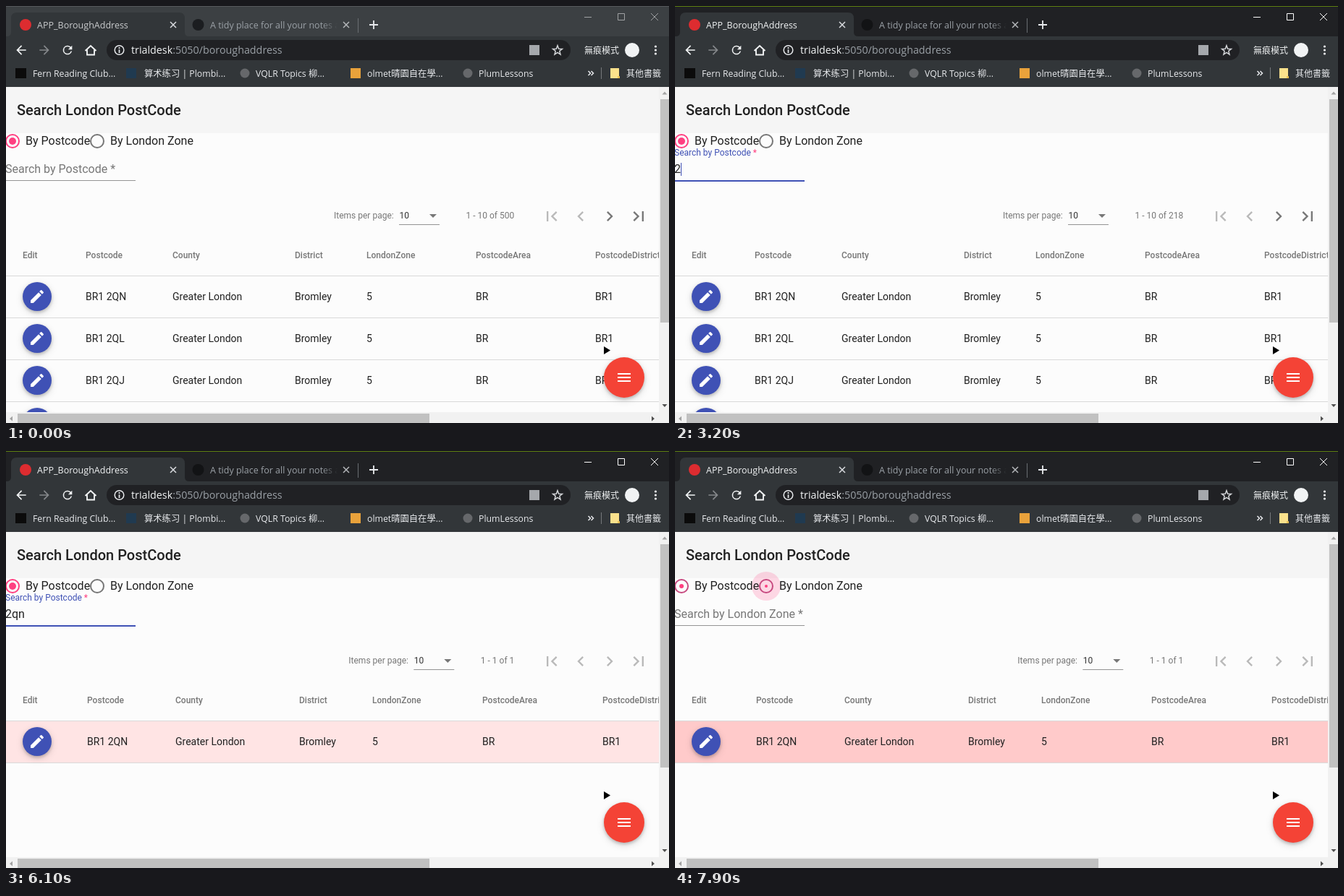
An HTML page that plays this animation: 916 by 577 pixels, repeating every 8 s.

```html
<!DOCTYPE html>
<html lang="en">
<head>
<meta charset="utf-8">
<title>Search table</title>
<style>
  html, body { margin: 0; width: 100%; height: 100%; overflow: hidden; background: #fcfcfc; }
  svg { display: block; }
  #stage { position: absolute; left: 0; top: 0; font-family: Roboto, "Liberation Sans", sans-serif; }
  text { white-space: pre; }
  .ui { font-family: "Open Sans", "Noto Sans CJK TC", "Noto Sans CJK", sans-serif; }
  .shadow { filter: drop-shadow(0 2px 2px rgba(0, 0, 0, .2)) drop-shadow(0 3px 5px rgba(0, 0, 0, .14)); }
</style>
</head>
<body>
<svg id="stage" width="916" height="577" viewBox="0 0 916 577"></svg>
<script>
const LOOP = 8000, STEP = 100;
const INK = '#212121', GREY = '#777777', BLUE = '#3f51b5', PINK = '#ff4081', PALE = '#9aa0a6';

const rect = (x, y, w, h, fill, more = '') =>
  `<rect x="${x}" y="${y}" width="${w}" height="${h}" fill="${fill}" ${more}/>`;
const circle = (x, y, r, fill, more = '') =>
  `<circle cx="${x}" cy="${y}" r="${r}" fill="${fill}" ${more}/>`;
const text = (x, y, str, size, fill, more = '') =>
  `<text x="${x}" y="${y}" font-size="${size}" fill="${fill}" ${more}>${str}</text>`;
const ui = (x, y, str, size, fill, more = '') => text(x, y, str, size, fill, 'class="ui" ' + more);
const fillPath = (d, fill, more = '') => `<path d="${d}" fill="${fill}" ${more}/>`;
const line = (d, stroke, width, more = '') =>
  `<path d="${d}" fill="none" stroke="${stroke}" stroke-width="${width}" ${more}/>`;
// A 24-unit glyph centred on a point
const glyph = (cx, cy, size, d, fill, more = '') =>
  `<path transform="translate(${cx - size / 2} ${cy - size / 2}) scale(${size / 24})" d="${d}" fill="${fill}" ${more}/>`;
const cross = (x, y, r, stroke, width) =>
  line(`M${x - r} ${y - r}l${2 * r} ${2 * r}m0 ${-2 * r}l${-2 * r} ${2 * r}`, stroke, width);

const ICON = {
  back: 'M20 11H7.83l5.59-5.59L12 4l-8 8 8 8 1.41-1.41L7.83 13H20z',
  forward: 'M12 4l-1.41 1.41L16.17 11H4v2h12.17l-5.58 5.59L12 20l8-8z',
  reload: 'M17.65 6.35A8 8 0 1 0 19.73 14h-2.08A6 6 0 1 1 12 6c1.66 0 3.14.69 4.22 1.78L13 11h7V4z',
  edit: 'M3 17.25V21h3.75L17.81 9.94l-3.75-3.75zM20.71 7.04a1 1 0 0 0 0-1.41l-2.34-2.34a1 1 0 0 0-1.41 0l-1.83 1.83 3.75 3.75z',
  menu: 'M3 18h18v-2H3zm0-5h18v-2H3zm0-7v2h18V6z',
  first: 'M18.41 16.59L13.82 12l4.59-4.59L17 6l-6 6 6 6zM6 6h2v12H6z',
  prev: 'M15.41 7.41L14 6l-6 6 6 6 1.41-1.41L10.83 12z',
  next: 'M10 6L8.59 7.41 13.17 12l-4.58 4.59L10 18l6-6z',
  last: 'M5.59 7.41L10.18 12l-4.59 4.59L7 18l6-6-6-6zM16 6h2v12h-2z'
};

function browser() {
  const light = '#e8eaed';
  const star = Array.from({ length: 10 }, (_, i) => {
    const a = i * Math.PI / 5 - Math.PI / 2, r = i % 2 ? 2.9 : 6.8;
    return `${(762 + r * Math.cos(a)).toFixed(1)} ${(61.5 + r * Math.sin(a)).toFixed(1)}`;
  }).join('L');
  return `<defs><linearGradient id="fade" gradientUnits="userSpaceOnUse" x1="436" x2="458" y1="0" y2="0">
      <stop stop-color="${PALE}"/><stop offset="1" stop-color="${PALE}" stop-opacity="0"/></linearGradient></defs>` +
    rect(0, 0, 916, 112, '#3c4043', 'id="frame"') +
    rect(0, 0, 916, 1, '#55585b', 'id="edge"') +
    fillPath('M0 42H1Q7 42 7 36V17Q7 9 15 9H239Q247 9 247 17V36Q247 42 253 42H916V112H0z', '#323639') +
    circle(27, 26, 8, '#dd2c30') +
    ui(43, 31, 'APP_BoroughAddress', 12.5, '#c9cbcd', 'id="tab"') +
    cross(231, 26, 4, '#dadce0', 1.5) +
    circle(265.5, 26, 8, '#1b1d20', 'id="dot"') +
    ui(282, 31, 'A tidy place for all your notes and', 12.5, 'url(#fade)') +
    cross(470, 26, 4, '#b4b7ba', 1.5) +
    rect(486, 17, 1, 20, '#6a6e72') +
    line('M502 26h12M508 20v12', light, 1.8) +
    `<g id="controls" stroke="#a0a2a4" fill="none"><path d="M799 15.5h10M845.5 10.5h9v9h-9zM891 10l10 10m0-10l-10 10"/></g>` +
    glyph(21, 61, 20, ICON.back, '#f1f3f4') +
    glyph(53, 61, 20, ICON.forward, '#85888b') +
    glyph(85, 61, 19, ICON.reload, '#f1f3f4') +
    line('M109.5 62l7.500-7 7.500 7M112 60v7.500h10V60', '#f1f3f4', 1.9) +
    rect(139, 47, 641, 28, '#202124', 'rx="14"') +
    circle(156.5, 61, 6.3, 'none', `stroke="${light}" stroke-width="1.5"`) +
    line('M156.500 57v2M156.500 60.300v4.700', light, 1.7) +
    ui(173, 66, `trialdesk<tspan fill="${PALE}">:5050/boroughaddress</tspan>`, 14.3, '#f1f3f4') +
    rect(723, 54, 14, 14, '#a5a8ac') +
    line(`M${star}z`, '#d2d4d7', 1.5) +
    ui(799, 66, '無痕模式', 12, '#f1f3f4') +
    circle(865, 61, 10, '#f1f3f4') +
    [56, 61, 66].map(y => circle(897.5, y, 1.6, '#f1f3f4')).join('') +
    rect(13, 86, 15, 14, '#0b0b0b') +
    rect(166, 86, 14, 14, '#203a50') +
    circle(330, 93, 6.5, '#66686b') +
    rect(476, 86, 14, 14, '#e9a23b') +
    circle(638, 93, 6.5, '#66686b') +
    [[37, 'Fern Reading Club...'], [191, '算术练习 | Plombi...'], [345, 'VQLR Topics 柳...'],
      [499, 'olmet晴園自在學...'], [653, 'PlumLessons']]
      .map(([x, s]) => ui(x, 98, s, 12.3, light)).join('') +
    line('M804.500 90l3 3-3 3M808.500 90l3 3-3 3', light, 1.5) +
    rect(822, 85, 1, 16, '#75787b') +
    fillPath('M835 86h12v14h-12z', '#fbe18c') + rect(845, 97, 3, 3, '#e8bf55') +
    ui(857, 98, '其他書籤', 12, light);
}

const radio = (x, id) =>
  circle(x, 187, 9, 'none', `id="ring${id}" stroke-width="2"`) + circle(x, 187, 0, PINK, `id="fill${id}"`);

function table(id, cols, codes) {
  const heads = ['Edit', 'Postcode', 'County', 'District', 'LondonZone', 'PostcodeArea', 'PostcodeDistrict'];
  const xs = [23, ...cols];
  let out = heads.map((h, i) => text(xs[i], 349, h, 12, GREY, 'font-weight="500"')).join('');
  out += rect(0, 373, 902, 1, 'rgba(0,0,0,.14)');
  codes.forEach((code, i) => {
    const y = 402 + i * 58;
    out += circle(43, y, 20, BLUE, 'class="shadow"') + glyph(43, y, 24, ICON.edit, '#fff');
    [code, 'Greater London', 'Bromley', '5', 'BR', 'BR1']
      .forEach((s, c) => { out += text(cols[c], y + 5, s, 14, INK); });
    out += rect(0, y + 29, 902, 1, 'rgba(0,0,0,.14)');
  });
  return `<g id="${id}">${out}</g>`;
}

function page() {
  return `<svg x="0" y="112" width="902" height="450" viewBox="0 112 902 450">` +
    rect(0, 112, 902, 450, '#fcfcfc') + rect(0, 112, 902, 64, '#f5f5f5') +
    text(15, 151, 'Search London PostCode', 20, INK, 'font-weight="500"') +
    circle(126, 187, 0, PINK, 'id="ripple" fill-opacity=".2"') +
    radio(9, 1) + radio(126, 2) +
    text(27, 192, 'By Postcode', 16, INK) + text(144, 192, 'By London Zone', 16, INK) +
    `<text id="label" font-size="16"><tspan id="hint"></tspan><tspan id="must"> *</tspan></text>` +
    text(-1, 231, '', 16, INK, 'id="value"') +
    rect(0, 241, 179, 1, '#949494') + rect(0, 241, 179, 2, BLUE, 'id="bar"') +
    line('M0 235' + 'l2 -2l2 2'.repeat(4), '#e53935', 1, 'id="wavy"') +
    rect(0, 217, 1, 18, BLUE, 'id="caret"') +
    `<g id="pager">` + text(453, 294, 'Items per page:', 12, GREY) + text(543.5, 294, '10', 12, '#333') +
    fillPath('M585 288h10l-5 5z', GREY) + rect(543, 302, 56, 1, '#949494') +
    text(635.5, 294, '', 12, GREY, 'id="range"') + `</g>` +
    glyph(754, 291, 28, ICON.first, '#b9b9b9') + glyph(794, 291, 28, ICON.prev, '#b9b9b9') +
    glyph(834, 291, 28, ICON.next, GREY, 'id="next"') + glyph(874, 291, 28, ICON.last, GREY, 'id="last"') +
    rect(0, 374, 902, 57, 'none', 'id="glow"') +
    table('all', [110, 230, 399, 498, 649, 814], ['BR1 2QN', 'BR1 2QL', 'BR1 2QJ', 'BR1 2QH']) +
    table('one', [112, 234, 405, 506, 658, 824], ['BR1 2QN']) +
    circle(854, 514, 28, '#f44336', 'class="shadow"') + glyph(854, 514, 24, ICON.menu, '#fff') +
    fillPath('M826 471v11l9-5.500z', '#000') + `</svg>` +
    rect(902, 112, 14, 465, '#f1f1f1') + rect(0, 562, 902, 15, '#f1f1f1') +
    rect(904, 129, 12, 309, '#c1c1c1') + rect(16, 564, 569, 13, '#c1c1c1') +
    fillPath('M906.500 122.500h7l-3.500-4zM9 567.500v7l-4-3.500z', '#a3a3a3') +
    fillPath('M906.500 551h7l-3.500 4zM892 567.500v7l4-3.500z', '#505050');
}

const stage = document.getElementById('stage');
stage.innerHTML = browser() + page();
const el = {};
stage.querySelectorAll('[id]').forEach(n => { el[n.id] = n; });

const set = (id, attrs) => { for (const k in attrs) el[id].setAttribute(k, attrs[k]); };
const show = (id, on) => set(id, { visibility: on ? 'visible' : 'hidden' });
const clamp = v => Math.max(0, Math.min(1, v));
const ease = p => 1 - (1 - p) ** 3;
const mix = (a, b, p) => '#' + [1, 3, 5].map(i => {
  const u = parseInt(a.slice(i, i + 2), 16), v = parseInt(b.slice(i, i + 2), 16);
  return Math.round(u + (v - u) * p).toString(16).padStart(2, '0');
}).join('');
const at = (steps, t) => steps.filter(s => s[0] <= t).pop()[1];

// Each step: start time, value
const VALUE = [[0, ''], [3200, '2'], [4000, '2q'], [5400, '2qn'], [7900, '']];
const CARET = [[0, -1], [2300, 0], [2600, -1], [3200, 8], [3700, -1], [4000, 17], [4500, -1],
  [5000, 17], [5400, 26], [5800, -1]];
const RANGE = [[0, ['1 - 10 of 500', 0]], [3200, ['1 - 10 of 218', 0]],
  [4000, ['1 - 10 of 10', 6.7]], [5400, ['1 - 1 of 1', 20.3]]];
const GLOW = [[0, 'none'], [6100, '#ffe4e4'], [6300, '#ffd6d6'], [6400, '#ffcaca']];

function draw(time) {
  const t = Math.floor(time / STEP) * STEP;
  const active = t >= 2300, zone = t >= 7900;

  set('frame', { fill: active ? '#202124' : '#3c4043' });
  set('edge', { fill: active ? '#5c7d0f' : '#55585b' });
  set('tab', { fill: active ? '#f1f3f4' : '#c9cbcd' });
  set('dot', { fill: active ? '#121315' : '#1b1d20' });
  set('controls', { stroke: active ? '#ffffff' : '#a0a2a4' });

  const rise = zone ? 0 : ease(clamp((t - 2200) / 400));
  const blur = clamp((t - 6200) / 300);
  const focus = rise * (1 - blur);
  set('label', { transform: `translate(-1 ${231 - 24 * rise}) scale(${1 - .25 * rise})` });
  el.hint.textContent = zone ? 'Search by London Zone' : 'Search by Postcode';
  set('hint', { fill: mix(GREY, BLUE, focus) });
  set('must', { fill: mix(GREY, PINK, focus) });
  const w = 179 * (.5 + .5 * rise);
  set('bar', { x: (179 - w) / 2, width: w, opacity: active ? 1 - blur : 0 });

  el.value.textContent = at(VALUE, t);
  const caret = at(CARET, t);
  show('caret', caret >= 0);
  set('caret', { x: Math.max(0, caret) });
  show('wavy', t >= 4900 && t < 5400);

  const [range, shift] = at(RANGE, t);
  el.range.textContent = range;
  set('pager', { transform: `translate(${shift} 0)` });
  const more = t < 4000 ? GREY : '#b9b9b9';
  set('next', { fill: more });
  set('last', { fill: more });

  show('all', t < 5400);
  show('one', t >= 5400);
  set('glow', { fill: at(GLOW, t) });

  set('ring1', { stroke: zone ? '#c74a80' : PINK });
  set('fill1', { r: zone ? 3 : 5 });
  set('ring2', { stroke: zone ? '#c74a80' : GREY });
  set('fill2', { r: zone ? 2 : 0 });
  set('ripple', { r: zone ? 20 : t >= 7800 ? 13 : 0 });
}

const start = performance.now();
function tick() {
  draw((performance.now() - start) % LOOP);
  requestAnimationFrame(tick);
}
tick();
</script>
</body>
</html>
```
